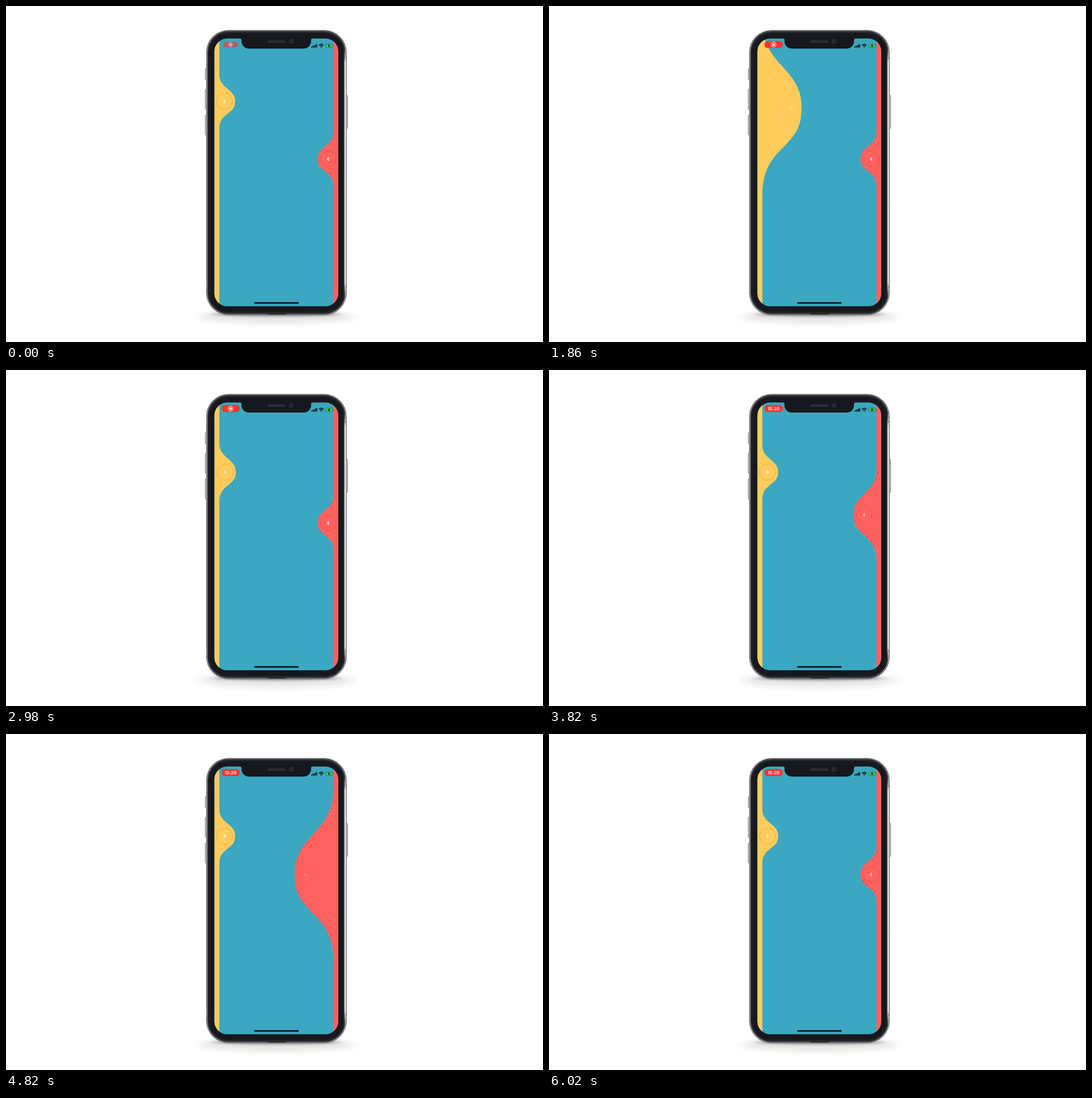
An HTML page for the animation above (6.5 s loop, 947 by 592 pixels).

```html
<!DOCTYPE html>
<html lang="en">
<head>
<meta charset="utf-8">
<title>Liquid swipe</title>
<style>
  html, body { margin: 0; width: 100%; height: 100%; overflow: hidden; background: #fff; }
  svg { display: block; width: 947px; height: 592px; }
  .time { font: 600 8px Inter, "Liberation Sans", sans-serif; fill: #fff; text-anchor: middle; }
</style>
</head>
<body>
<svg viewBox="0 0 947 592">
  <defs>
    <linearGradient id="rim" x2="0" y2="1">
      <stop offset="0" stop-color="#6c6e72"/>
      <stop offset=".08" stop-color="#c4c5c7"/>
      <stop offset=".93" stop-color="#c4c5c7"/>
      <stop offset="1" stop-color="#85878a"/>
    </linearGradient>
    <linearGradient id="sheen" x2="0" y2="1">
      <stop offset="0" stop-color="#d8d9da" stop-opacity="0"/>
      <stop offset=".06" stop-color="#d8d9da"/>
      <stop offset=".94" stop-color="#d8d9da"/>
      <stop offset="1" stop-color="#d8d9da" stop-opacity="0"/>
    </linearGradient>
    <filter id="soft" x="-20%" y="-200%" width="140%" height="500%">
      <feGaussianBlur stdDeviation="10 5"/>
    </filter>
    <filter id="tight" x="-20%" y="-200%" width="140%" height="500%">
      <feGaussianBlur stdDeviation="9 2"/>
    </filter>
    <clipPath id="screen">
      <rect x="367.6" y="57.3" width="218.2" height="471.8" rx="22.5"/>
    </clipPath>
  </defs>

  <!-- ground shadow -->
  <ellipse cx="477" cy="548" rx="138" ry="12" fill="#000" opacity=".09" filter="url(#soft)"/>
  <ellipse cx="477" cy="543" rx="112" ry="4" fill="#000" opacity=".36" filter="url(#tight)"/>

  <!-- side keys -->
  <g fill="#e6e7e8" stroke="#55575b" stroke-width=".8">
    <rect x="351.4" y="110.5" width="4" height="19" rx="1"/>
    <rect x="351.4" y="146.5" width="4" height="35.5" rx="1"/>
    <rect x="351.4" y="192" width="4" height="35.5" rx="1"/>
    <rect x="598.4" y="157.5" width="4" height="58" rx="1"/>
  </g>

  <!-- body -->
  <rect x="353" y="42.4" width="247.7" height="502.2" rx="39.5" fill="#3b3d41"/>
  <rect x="354.5" y="43.9" width="244.7" height="499.2" rx="38" fill="none" stroke="url(#rim)" stroke-width="1.2"/>
  <rect x="355.5" y="44.9" width="242.7" height="497.2" rx="37" fill="#24262b"/>
  <rect x="358.5" y="48" width="236.5" height="491" rx="33" fill="#17181d"/>
  <rect x="596.6" y="74" width="3" height="440" fill="url(#sheen)"/>
  <g fill="#85878b">
    <rect x="353" y="90" width="2.5" height="3"/>
    <rect x="598.2" y="90" width="2.5" height="3"/>
    <rect x="353" y="493" width="2.5" height="3"/>
    <rect x="598.2" y="493" width="2.5" height="3"/>
  </g>
  <rect x="461" y="541.4" width="33" height="2.2" rx="1" fill="#26282d"/>

  <!-- screen -->
  <g clip-path="url(#screen)">
    <rect x="367" y="57" width="220" height="473" fill="#3ca7c0"/>
    <g id="waves"></g>
    <rect x="437.6" y="521.7" width="78.4" height="2.9" rx="1.45" fill="#0b0d10"/>
  </g>

  <!-- notch -->
  <path d="M412.8 56H540.4V57.3Q538 57.3 538 59.8V62A13 13 0 0 1 525 75H428.3A13 13 0 0 1 415.3 62V59.8Q415.3 57.3 412.8 57.3Z" fill="#17181d"/>
  <rect x="460.8" y="60.2" width="32" height="4.8" rx="2.4" fill="#2c2e34"/>
  <circle cx="502.9" cy="62.4" r="4.1" fill="#2c2e34"/>
  <circle cx="502.9" cy="62.4" r="1.8" fill="#1f2127"/>

  <!-- status icons -->
  <g fill="#0c1013">
    <rect x="538.6" y="71" width="1.9" height="2.3" rx=".5"/>
    <rect x="541.3" y="69.8" width="1.9" height="3.5" rx=".5"/>
    <rect x="544" y="68.4" width="1.9" height="4.9" rx=".5"/>
    <rect x="546.7" y="66.9" width="1.9" height="6.4" rx=".5"/>
    <path d="M556 73.4L554.5 71.8Q556 70.6 557.5 71.8Z"/>
  </g>
  <g fill="none" stroke="#0c1013" stroke-width="1.25">
    <path d="M551.8 69.2Q556 65.3 560.2 69.2"/>
    <path d="M553.3 70.9Q556 68.5 558.7 70.9"/>
  </g>
  <rect x="563.9" y="67.1" width="11.8" height="6.1" rx="1.7" fill="#2fd158" stroke="#235a58" stroke-width=".7"/>
  <path d="M576.6 69v2.3q1-.3 1-1.15t-1-1.15Z" fill="#5b4750"/>
  <path d="M570.7 67.3L567.3 70.6H569.4L568.8 73.1L572.2 69.7H570.1Z" fill="#0c1013"/>

  <!-- recording pill -->
  <g id="pill">
    <rect x="380" y="61.8" width="32.1" height="12.3" rx="5.8" fill="#fc3330"/>
    <g id="record">
      <circle cx="396" cy="68" r="4.3" fill="none" stroke="#fff"/>
      <circle cx="396" cy="68" r="2.3" fill="#fff"/>
    </g>
    <text id="clock" class="time" x="396" y="70.9">15:20</text>
  </g>
</svg>

<script>
const LOOP = 6500;
const SCALE = 218 / 375;
const SIDE = 15 * SCALE, TOP = 50, BOTTOM = 535;
const HR = [48 * SCALE, 300 * SCALE];          // bulge depth, rest and full
const VR = [82 * SCALE, 730.8 * SCALE];        // bulge half height, rest and full

// Bulge outline from bottom to top, as shares of depth and half height.
const OUTLINE = [
  [0, 0], [0, .1346], [.0534, .2413], [.1562, .3322],
  [.2362, .4031], [.3305, .4561], [.5012, .5351],
  [.5159, .5418], [.5664, .565], [.5749, .569],
  [.7284, .6397], [.8087, .6833], [.8774, .7399],
  [.9653, .8123], [1, .8936], [1, 1],
  [1, 1.1001], [.9596, 1.1888], [.8608, 1.2705],
  [.7852, 1.3331], [.7034, 1.3796], [.5291, 1.4665],
  [.5242, 1.469], [.5057, 1.4782], [.5015, 1.4803],
  [.3187, 1.5714], [.2332, 1.6204], [.1541, 1.6874],
  [.051, 1.7748], [0, 1.8709], [0, 2]
];

const SIDES = [
  {
    edge: 367.5, dir: 1, color: '#ffcc5c', release: 2350,
    pull: [[900, 0], [1280, .048], [1860, .1125], [2150, .127], [2350, .127]],
    center: [[900, 168.2], [1000, 174], [1280, 177.5], [1860, 179.6], [2200, 180]]
  },
  {
    edge: 586.1, dir: -1, color: '#ff625e', release: 5390,
    pull: [[3560, 0], [3900, .047], [4400, .117], [4620, .122], [5260, .055], [5390, .045]],
    center: [[3560, 269.5], [3700, 259], [4000, 252], [4400, 248], [5260, 247.5]]
  }
];

const clamp = (v, lo = 0, hi = 1) => Math.min(hi, Math.max(lo, v));
const mix = ([a, b], k) => a + (b - a) * k;
const ramp = (t, from, to) => {
  const k = clamp((t - from) / (to - from));
  return k * k * (3 - 2 * k);
};

// Smooth curve through [time, value] pairs without overshoot.
function follow(keys, t) {
  const last = keys.length - 1;
  if (t <= keys[0][0]) return keys[0][1];
  if (t >= keys[last][0]) return keys[last][1];
  const slope = i => (keys[i + 1][1] - keys[i][1]) / (keys[i + 1][0] - keys[i][0]);
  const tangent = i => {
    if (i === 0 || i === last) return 0;
    const a = slope(i - 1), b = slope(i);
    return a * b > 0 ? 2 * a * b / (a + b) : 0;
  };
  const i = keys.findIndex(k => k[0] > t) - 1;
  const [t0, v0] = keys[i], [t1, v1] = keys[i + 1];
  const span = t1 - t0, k = (t - t0) / span, q = 1 - k;
  return q * q * (1 + 2 * k) * v0 + k * k * (3 - 2 * k) * v1
    + k * q * span * (q * tangent(i) - k * tangent(i + 1));
}

// Underdamped spring from 1 to 0: response 0.55 s, damping 0.5.
function spring(ms) {
  if (ms <= 0) return 1;
  const t = ms / 1000, omega = 2 * Math.PI / .55, zeta = .5;
  const root = Math.sqrt(1 - zeta * zeta), a = omega * root * t;
  return Math.exp(-zeta * omega * t) * (Math.cos(a) + zeta / root * Math.sin(a));
}

function wavePath({ edge, dir }, cy, p) {
  const k = clamp(p / .4), hr = mix(HR, k), vr = mix(VR, k);
  const wall = edge + dir * SIDE, outer = edge - dir * 3;
  const [start, ...curve] = OUTLINE.map(([h, v]) =>
    `${(wall + dir * h * hr).toFixed(2)} ${(cy + vr * (1 - v)).toFixed(2)}`);
  return `M${outer} ${BOTTOM}H${wall}L${start}C${curve.join(' ')}L${wall} ${TOP}H${outer}Z`;
}

function add(parent, name, attrs) {
  const el = document.createElementNS('http://www.w3.org/2000/svg', name);
  for (const key in attrs) el.setAttribute(key, attrs[key]);
  return parent.appendChild(el);
}

const byId = id => document.getElementById(id);
const pill = byId('pill'), record = byId('record'), clock = byId('clock');

for (const side of SIDES) {
  side.wave = add(byId('waves'), 'path', { fill: side.color });
  side.button = add(byId('waves'), 'g', {});
  add(side.button, 'circle', { r: 14.1, fill: 'none', stroke: '#000', 'stroke-opacity': .2, 'stroke-width': .7 });
  add(side.button, 'path', {
    d: `M${-1.2 * side.dir} -2.7L${1.2 * side.dir} 0L${-1.2 * side.dir} 2.7`,
    fill: 'none', stroke: '#fff', 'stroke-width': 1.4
  });
}

function draw(t) {
  for (const side of SIDES) {
    const p = follow(side.pull, t) * spring(t - side.release);
    const cy = follow(side.center, t);
    const x = side.edge + side.dir * (SIDE + mix(HR, p / .4) - 18.8);
    side.wave.setAttribute('d', wavePath(side, cy, p));
    side.button.setAttribute('transform', `translate(${x.toFixed(2)} ${cy.toFixed(2)})`);
    side.button.setAttribute('opacity', clamp(1 - 6 * p));
  }

  const shown = ramp(t, 40, 420), size = mix([.78, 1], shown);
  pill.setAttribute('transform', `translate(396 68) scale(${size}) translate(-396 -68)`);
  pill.setAttribute('opacity', mix([.66, 1], shown));
  const swap = ramp(t, 3500, 3700);
  record.setAttribute('opacity', 1 - swap);
  clock.setAttribute('opacity', swap);
}

const begin = performance.now();
function tick() {
  draw((performance.now() - begin) % LOOP);
  requestAnimationFrame(tick);
}
tick();
</script>
</body>
</html>
```
